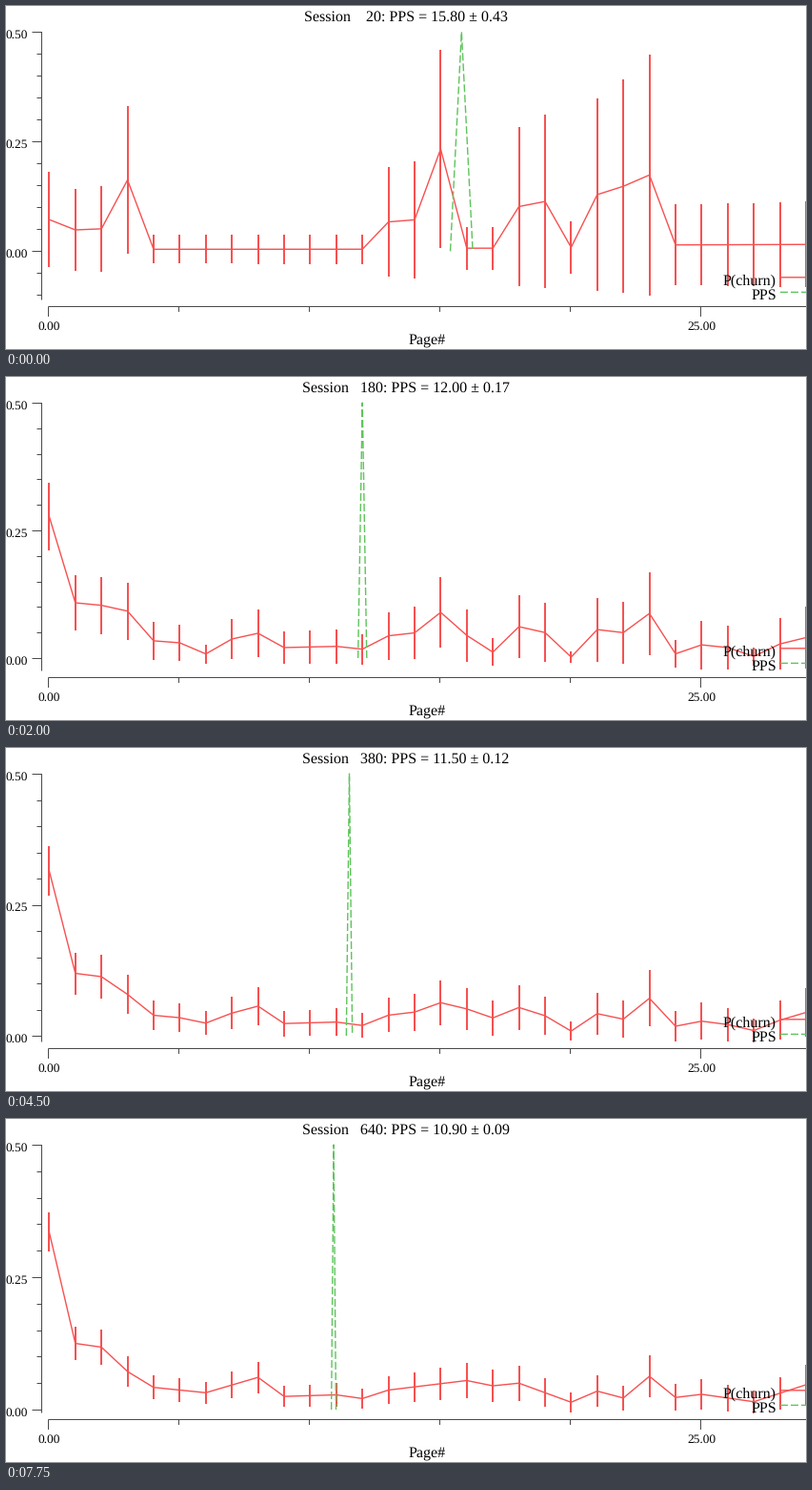
Recreate the animation shown at these times as a matplotlib script. Size 840 by 360 pixels, loop 8000 ms.

```python
import numpy as np
import matplotlib.pyplot as plt
from matplotlib.animation import FuncAnimation
from matplotlib.collections import LineCollection

W, H, DPI = 840, 360, 100
PT = 72 / DPI                       # points per pixel
FRAMES, INTERVAL = 32, 250
STEP = 20                           # sessions per frame
LAST = STEP * FRAMES
LEFT, PAGE_W = 45.4, 27.4           # x of page 0, width of one page
TOP, BOTTOM = 27, 308.5             # y of 0.50 and of the lowest bar end
RED, GREEN, AXIS = "#f75151", "#5fc45c", "#4a4a4a"

plt.rcParams.update({
    "font.family": "Liberation Serif",
    "text.hinting": "none",
    "lines.scale_dashes": False,
})

pages = np.arange(30)


def early_churn():
    """Rates after the first few visits: a few pages lost part of a visit."""
    lost = np.full(len(pages), 0.0153)
    lost[[1, 2, 13, 14, 18, 19, 21, 22, 23]] = 0.225
    lost[[3, 15]] = 0.68
    lost[0] = 0.36
    alive = STEP / 4 - np.append(0, np.cumsum(lost)[:-1])
    return lost / alive


EARLY = early_churn()

# Settled rates: steep drop, then a low wave with a few dips and spikes
KNOTS = [(0, .335), (1, .125), (2, .118), (3, .072), (4, .042), (6, .032),
         (8, .061), (9, .025), (11, .028), (12, .021), (13, .037),
         (16, .055), (17, .045), (18, .050), (20, .014), (21, .035),
         (22, .022), (23, .063), (24, .023), (25, .029), (27, .015),
         (29, .047)]
LATE = np.interp(pages, *zip(*KNOTS))

# Session at which a page loses its first visitor
first_loss = np.zeros(len(pages))
first_loss[[6, 17, 24]] = 140
first_loss[[20, 27]] = 220

# Key points of the pages-per-session estimate
PPS = {20: 15.8, 140: 12.4, 240: 11.6, 380: 11.5,
       480: 11.6, 560: 11.1, 640: 10.9}


def estimate(session):
    fade = (STEP / session) ** 0.4
    end = (STEP / LAST) ** 0.4
    w = (fade - end) / (1 - end)
    seen = np.maximum(0, 1 - first_loss / session) / (1 - first_loss / LAST)
    p = w * EARLY + (1 - w) * LATE * seen
    alive = session / 4 * np.append(1, np.cumprod(1 - p)[:-1])
    return p, np.sqrt(p * (1 - p) / (alive + 0.6))


def pages_per_session(session):
    total = np.interp(session, list(PPS), [s * v for s, v in PPS.items()])
    err = min(0.43, 2.247 / session ** 0.5)
    return round(total / session, 1), err


fig = plt.figure(figsize=(W / DPI, H / DPI), dpi=DPI, facecolor="white")
ax = fig.add_axes([0, 0, 1, 1])
ax.set_xlim(0, W)
ax.set_ylim(H, 0)
ax.axis("off")


def line(x, y, color, width, **kw):
    return ax.plot(x, y, color=color, lw=width * PT, snap=False,
                   solid_capstyle="butt", **kw)[0]


def label(x, y, text, size, align="center"):
    return ax.text(x, y, text, fontsize=size * PT, ha=align,
                   va="baseline", color="black", zorder=5)


def segments(color, width, zorder):
    lines = LineCollection([], colors=color, linewidths=width * PT,
                           capstyle="butt", zorder=zorder)
    ax.add_collection(lines, autolim=False)
    return lines


def page_x(page):
    return LEFT + PAGE_W * page


dash = dict(dashes=(8 * PT, 3 * PT), dash_capstyle="butt")
xs = page_x(pages)

# Fixed axes, captions and legend
line([37.5, 37.5], [TOP, BOTTOM], AXIS, 1)
line([44.5, W], [315.5, 315.5], AXIS, 1)
for n in range(0, 30, 5):
    x = int(page_x(n)) - 0.5
    line([x, x], [315.5, 326 if n % 25 == 0 else 321], AXIS, 1)
for n in (0, 25):
    label(page_x(n) - 0.4, 339.5, f"{n:.2f}", 13.33)
label(442.5, 355, "Page#", 16)
label(809, 293, "P(churn)", 16, "right")
label(809, 308, "PPS", 16, "right")
line([813, W], [284.8, 284.8], RED, 1.4, zorder=4)
line([813, W], [300.4, 300.4], GREEN, 1.4, zorder=4, **dash)

# Moving parts
title = label(420, 15.5, "", 16)
marks = [(v, label(22.7, 0, f"{v:.2f}", 13.33, "right"))
         for v in (0, 0.25, 0.5)]
ticks = segments(AXIS, 1, 2)
bars = segments(RED, 2, 3)
curve = line(xs, xs, RED, 1.4, zorder=3)
peak = line([], [], GREEN, 1.4, zorder=4, **dash)


def draw(i):
    session = STEP * (i + 1)
    p, dev = estimate(session)
    pps, err = pages_per_session(session)
    zero = 310 - 3370 / (session + 44)      # sinks as the bars shrink

    def to_y(v):
        return zero - v * (zero - TOP) / 0.5

    title.set_text(f"Session {session:5d}: PPS = {pps:.2f} ± {err:.2f}")
    for v, text in marks:
        text.set_y(to_y(v) + 6.5)

    steps = [n for n in range(-4, 11) if to_y(n / 20) <= BOTTOM]
    ticks.set_segments([[(27 if n % 5 == 0 else 32, to_y(n / 20)),
                         (37.4, to_y(n / 20))] for n in steps])

    low = np.minimum(to_y(p - dev), BOTTOM)
    bars.set_segments([[(x, a), (x, b)]
                       for x, a, b in zip(xs, to_y(p + dev), low)])
    curve.set_ydata(to_y(p))
    peak.set_data(page_x(np.array([pps - err, pps, pps + err])),
                  to_y(np.array([0, 0.5, 0])))
    return [title, ticks, bars, curve, peak]


anim = FuncAnimation(fig, draw, frames=FRAMES, interval=INTERVAL,
                     repeat=True, repeat_delay=0, blit=False)
plt.show()
```
